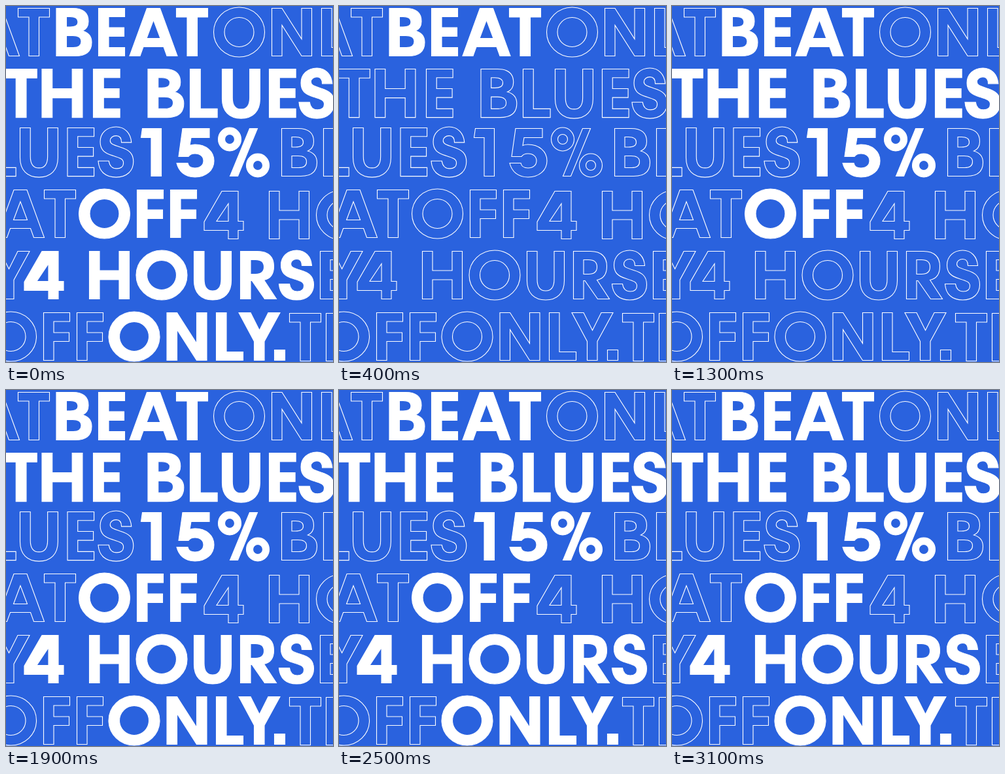
These frames come from a looping animation (500x545 px, 5100 ms). An HTML page:

```html
<!DOCTYPE html>
<html lang="en">
<head>
<meta charset="utf-8">
<title>Beat the blues</title>
<style>
html, body { margin: 0; width: 100%; height: 100%; overflow: hidden; background: #2a62de; }
svg { display: block; width: 500px; height: 545px; }
path { fill: none; fill-rule: evenodd; stroke: #fff; stroke-width: 1.1; }
.lit path { fill: #fff; }
</style>
</head>
<body>
<svg id="stage" viewBox="0 0 500 545" role="img" aria-label="Beat the blues 15% off 4 hours only."></svg>
<script>
const LOOP = 5100, STEP = 300, START = 100;
const NS = 'http://www.w3.org/2000/svg';

const ring = (cx, cy, rx, ry = rx) =>
  `M${cx - rx} ${cy}a${rx} ${ry} 0 1 1 ${2 * rx} 0a${rx} ${ry} 0 1 1 ${-2 * rx} 0Z`;

// Letter shapes: cap height 73, top left at 0,0
const GLYPHS = {
  A: 'M26.500 0H46.500L73 73H57L52 59H21L16 73H0ZM36.500 18L26 46H47Z',
  B: 'M0 0H25C42 0 49 8 49 20C49 27 46 32 40 34.500C49 37 54 43 54 52C54 66 45 73 29 73H0Z' +
     'M15.500 13V28.500H21C29 28.500 33 26.500 33 21S29 13 21 13Z' +
     'M15.500 42V60H26C34 60 38 57 38 51S34 42 25 42Z',
  E: 'M0 0H40V13H15.500V29.500H39V43H15.500V60H40V73H0Z',
  F: 'M0 0H40V13.500H15.500V30.500H39V44H15.500V73H0Z',
  H: 'M0 0H15.500V29.500H45.500V0H61V73H45.500V43.500H15.500V73H0Z',
  L: 'M0 0H15.500V60H41V73H0Z',
  N: 'M0 0H15.500L45.500 47V0H61V73H45.500L15.500 26V73H0Z',
  O: ring(39, 36.5, 39, 38) + ring(39, 36.5, 22.5),
  R: 'M0 0H26C43 0 51 9 51 23C51 35 46 42 36 44L55 73H37L17.500 45H15.500V73H0Z' +
     'M15.500 13V35H23C32 35 36 31 36 24S32 13 23 13Z',
  S: 'M50 22C49 8 40 -1.500 27 -1.500C13 -1.500 3 8 3 21C3 33 9 38 22 42C33 45.500 38 47 38 53' +
     'C38 58.500 34 61.500 28 61.500C20 61.500 17 57 16 50H0C1 66 11 74.500 27 74.500' +
     'C43 74.500 53 65 53 51C53 39 47 33 33 29C22 25.500 18 24 18 19.500C18 15 22 12 27 12C32 12 35 15 35 22Z',
  T: 'M0 0H48V13.500H32V73H16.500V13.500H0Z',
  U: 'M0 0H15.500V43C15.500 54 19 60.500 28.500 60.500S41.500 54 41.500 43V0H57V45' +
     'C57 64 46 74.500 28.500 74.500S0 64 0 45Z',
  Y: 'M0 0H18L31.500 27L45 0H63L39 44V73H23.500V44Z',
  1: 'M2 0H31V73H15.500V14H0Z',
  4: 'M27 0H52V46H60V60H52V73H37V60H0V47ZM37 19V46H19Z',
  5: 'M9 0H50V14H22L20 26C22 25 25 24.500 28 24.500C45 24.500 57 35 57 49.500C57 64 45 74.500 28 74.500' +
     'C13 74.500 3 66 0 53H17C18 58 22 60.500 28 60.500C36 60.500 41 56 41 49.500S36 38.500 28 38.500' +
     'C23 38.500 20 40 18 43H3Z',
  '%': ring(17.5, 16.5, 17.5, 18) + ring(17.5, 16.5, 7.5) + ring(60.5, 56.5, 17.5, 18) +
       ring(60.5, 56.5, 7.5) + 'M48 0H60L30 73H18Z',
  '.': 'M0 57H16V73H0Z'
};

// Each row: top, then [letters, left edges, drop, scale]; the second run lights up
const ROWS = [
  [3.5, ['AT', [-52.5, 18.5]], ['BEAT', [77, 141.5, 189, 260.5]], ['ONL', [317.5, 406.5, 482.5]]],
  [96.5, ['', []], ['THEBLUES', [-1.5, 55, 133.5, 217, 281.5, 330.5, 402.5, 448], 0, 1.015], ['', []]],
  [187.5, ['LUES', [-26.5, 21.5, 94, 141], -1, 1.015], ['15%', [206.5, 261, 324.5]], ['BE', [421.5, 485.5]]],
  [281.5, ['AT', [-14.5, 58.5]], ['OFF', [111.5, 200.5, 251.5]], ['4HO', [303, 402.5, 474.5], 2]],
  [375.5, ['Y', [-27]], ['4HOURS', [28, 127.5, 199, 287.5, 358.5, 417.5]], ['E', [480.5]]],
  [469.5, ['OFF', [-31.5, 57.5, 108.5]], ['ONLY.', [157, 246, 321.5, 356, 410.5]], ['TH', [433.5, 489.5], 1]]
];

function add(parent, tag, attrs = {}) {
  const node = document.createElementNS(NS, tag);
  for (const key in attrs) node.setAttribute(key, attrs[key]);
  return parent.appendChild(node);
}

const stage = document.getElementById('stage');
const words = ROWS.map(([top, ...runs]) => runs.map(([letters, xs, drop = 0, scale = 1]) => {
  const group = add(stage, 'g');
  [...letters].forEach((ch, i) => add(group, 'path', {
    d: GLYPHS[ch],
    transform: `translate(${xs[i]} ${top + drop}) scale(${scale})`
  }));
  return group;
})[1]);

// Number of lit words: all, one by one, two blinks, hold
function litCount(t) {
  if (t < START) return words.length;
  const step = Math.floor((t - START) / STEP);
  if (step <= words.length) return step;
  return step === 7 || step === 9 ? 0 : words.length;
}

function draw(t) {
  const count = litCount(t);
  words.forEach((word, i) => word.setAttribute('class', i < count ? 'lit' : ''));
}

const begin = performance.now();
function frame() {
  draw((performance.now() - begin) % LOOP);
  requestAnimationFrame(frame);
}
draw(0);
requestAnimationFrame(frame);
</script>
</body>
</html>
```
